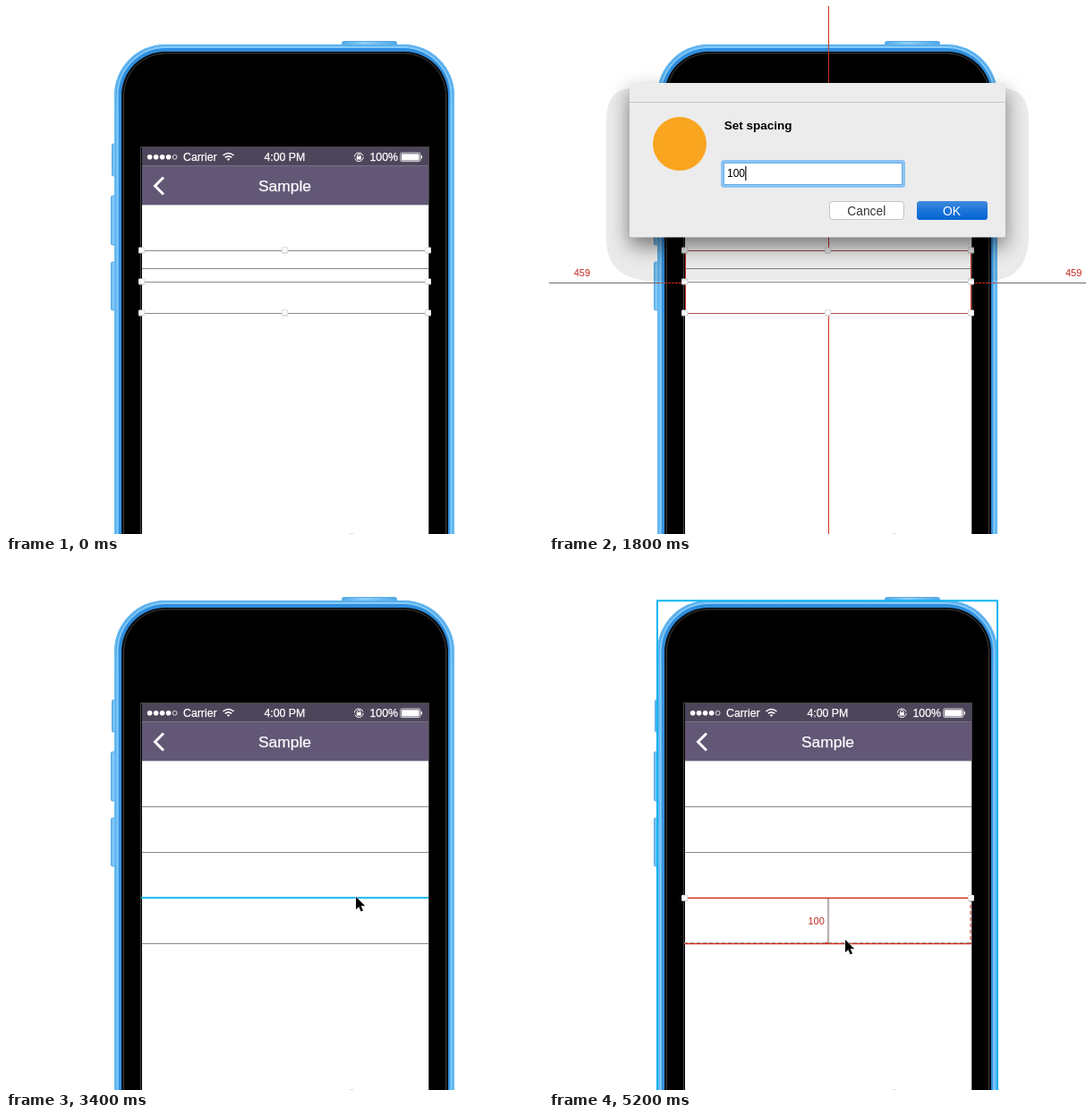
These frames come from a looping animation (600 by 590 pixels, 5700 ms). An HTML page:

```html
<!DOCTYPE html>
<html lang="en">
<head>
<meta charset="utf-8">
<title>Set spacing and measure</title>
<style>
  html, body { margin: 0; width: 100%; height: 100%; overflow: hidden; background: #fff; }
  svg { display: block; width: 600px; height: 590px; }
  text { font-family: "Liberation Sans", Arial, sans-serif; }
  .ui text { fill: #fff; stroke: #fff; stroke-width: .25px; font-size: 12.3px; }
  .ui .title { font-size: 17.4px; }
  .red { fill: none; stroke: #d0301f; }
  .num { fill: #c0261c; font-size: 11px; }
  .mid { text-anchor: middle; }
  .button { fill: url(#edge); stroke: #4a9fe0; stroke-width: .8; }
  #dialog { transform-origin: 300px 172px; }
  #sheet { filter: drop-shadow(0 10px 11px rgba(0, 0, 0, .5)); }
</style>
</head>
<body>
<svg viewBox="0 0 600 590">
  <defs>
    <linearGradient id="edge">
      <stop offset="0" stop-color="#4fa9ea"/>
      <stop offset=".4" stop-color="#8fd0fa"/>
      <stop offset="1" stop-color="#4fa9ea"/>
    </linearGradient>
    <linearGradient id="body" x2="0" y2="1">
      <stop offset="0" stop-color="#2f8fdf"/>
      <stop offset=".12" stop-color="#55aeee"/>
    </linearGradient>
    <linearGradient id="blue" x2="0" y2="1">
      <stop offset="0" stop-color="#62b6fb"/>
      <stop offset=".5" stop-color="#2a93fa"/>
      <stop offset="1" stop-color="#087af2"/>
    </linearGradient>
    <g id="handle">
      <rect x="-3.5" y="-3.5" width="7" height="7" rx="1" fill="#c9c9c9"/>
      <rect x="-3" y="-3" width="6" height="5.5" rx="1" fill="#fafafa"/>
    </g>
  </defs>

  <g id="phone">
    <rect class="button" x="375.5" y="39.5" width="61" height="8" rx="2"/>
    <rect class="button" x="118.5" y="154" width="6" height="36" rx="1.5"/>
    <rect class="button" x="117.5" y="212" width="6" height="55" rx="1.5"/>
    <rect class="button" x="117.5" y="286" width="6" height="54" rx="1.5"/>
    <rect x="121" y="43" width="380" height="700" rx="57" fill="url(#body)"/>
    <rect x="122" y="44" width="378" height="700" rx="56" fill="none" stroke="#68baf2" stroke-width="1.6"/>
    <rect x="124.5" y="46" width="373" height="700" rx="54" fill="none" stroke="#86cbf8" stroke-width="1.8"/>
    <rect x="127.5" y="49" width="367" height="700" rx="51" fill="none" stroke="#2f8ddd" stroke-width="2.4"/>
    <rect x="129" y="51" width="365" height="700" rx="49" fill="#0a0d12"/>
    <rect x="131.5" y="53" width="360" height="700" rx="47" stroke="#3a3a3a"/>
    <rect x="150.5" y="157.5" width="322" height="450" stroke="#444"/>
    <rect x="152" y="222" width="320" height="368" fill="#fff"/>
    <rect x="152" y="158" width="320" height="21" fill="#4d465b"/>
    <rect x="152" y="179" width="320" height="43" fill="#625876"/>
    <path d="M152 178.5H472" stroke="#77717f"/>
    <path d="M152 222.5H472" stroke="#c9c5d0"/>
    <path d="M384 589.5h4" stroke="#ddd"/>
  </g>

  <g class="ui">
    <g id="signal" fill="#fff"></g>
    <text x="198" y="173">Carrier</text>
    <g fill="none" stroke="#fff" stroke-width="1.6">
      <path d="M242.5 167q6-5 12 0M244.8 169.4q3.7-3 7.4 0"/>
      <path d="M248.5 173l-1.8-2q1.8-1.3 3.6 0z" fill="#fff" stroke="none"/>
    </g>
    <text class="mid" x="311.3" y="173">4:00 PM</text>
    <g fill="none" stroke="#fff">
      <circle cx="394.3" cy="168.8" r="4.8" stroke-dasharray="13 2"/>
      <path d="M392.8 168v-1a1.5 1.5 0 0 1 3 0v1"/>
    </g>
    <rect x="391.8" y="168" width="5" height="3.6" fill="#fff"/>
    <text x="406.5" y="173">100%</text>
    <rect x="440.8" y="164" width="22" height="9.6" rx="1.5" fill="none" stroke="#fff" stroke-width=".8"/>
    <rect x="442" y="165.2" width="19.6" height="7.2" rx=".5" fill="#fff"/>
    <path d="M464.3 167v3.6" stroke="#fff" stroke-width="1.4"/>
    <path d="M176 191.5L166.5 201l9.5 9.5" fill="none" stroke="#fff" stroke-width="3"/>
    <text class="title mid" x="311.5" y="207">Sample</text>
  </g>

  <path id="rows" stroke="#8a8a8a"/>
  <path id="hot" d="M151 375H472" stroke="#10b5ee" stroke-width="2"/>
  <path id="frame" d="M121 600V43.2H501V600" fill="none" stroke="#0fb4f0" stroke-width="2"/>

  <g id="guides">
    <path id="level" d="M0 309.5H121M501 309.5H600"/>
    <path class="red" d="M121 309.5H152M472 309.5H501" stroke-dasharray="3 1"/>
    <path class="red" d="M312.5 0V273M312.5 344V590M152.5 273V344M471.5 273V344"/>
    <path d="M152 273.5H472M152 343.5H472" stroke="#a85450"/>
    <text class="num" x="27.7" y="302">459</text>
    <text class="num" x="577" y="302">459</text>
    <text class="num" x="290" y="105" style="fill:#e0281c">686</text>
  </g>

  <g id="measure">
    <path d="M312 1V51" stroke="#bdb4b4" stroke-width="2.4"/>
    <path d="M308 50.5h8" class="red"/>
    <path d="M151 .5H472" class="red" stroke-width="1.4"/>
    <path d="M151 51.5H472" class="red" stroke-width="1.4"/>
    <path d="M471 1V51" class="red" stroke="#d9603a" stroke-dasharray="4 3"/>
    <path id="dash" d="M151 0H472" stroke="#999" stroke-dasharray="4 3"/>
    <text class="num" x="289.5" y="30">100</text>
  </g>
  <g id="handles"></g>

  <g id="dialog">
    <path d="M64 128Q64 94 90 92H510Q536 94 536 128V260Q534 307 490 307H112Q64 304 64 260Z" fill="#000" fill-opacity=".08"/>
    <rect id="sheet" x="90" y="86" width="420" height="172.5" rx="3" fill="#ececec"/>
    <path d="M90 107.5H510" stroke="#c6c6c6"/>
    <circle cx="146" cy="154" r="30" fill="#f9a51f"/>
    <text x="195.7" y="138" font-size="13.5" font-weight="bold">Set spacing</text>
    <rect x="193.5" y="173.5" width="203" height="28" rx="2" fill="#fff" stroke="#8cc4f2" stroke-width="3"/>
    <rect x="195.5" y="175.5" width="199" height="24" fill="none" stroke="#6aaee6"/>
    <text id="value" x="199" y="191" font-size="12"></text>
    <path id="caret" stroke="#111" stroke-width="1.2"/>
    <rect x="313.5" y="218.5" width="83" height="20" rx="3.5" fill="#fff" stroke="#c3c3c3"/>
    <text class="mid" x="354.8" y="233.5" font-size="13.8" fill="#333">Cancel</text>
    <rect x="411" y="218" width="79" height="21" rx="3.5" fill="url(#blue)"/>
    <rect id="press" x="411" y="218" width="79" height="21" rx="3.5" fill="#003a9c" fill-opacity=".35"/>
    <text class="mid" x="450" y="233.5" font-size="13.8" fill="#fff">OK</text>
  </g>

  <path id="cursor" d="M0 0V14.2L3.3 11.2L5.6 16.6L8 15.6L5.7 10.3H10.2Z" stroke="#fff" stroke-width="1.1" paint-order="stroke"/>
</svg>
<script>
  const LOOP = 5700;
  const $ = id => document.getElementById(id);
  const show = (id, on) => { $(id).style.display = on ? '' : 'none'; };

  $('signal').innerHTML = [0, 1, 2, 3, 4].map(i =>
    `<circle cx="${160.6 + 7 * i}" cy="168.8" r="${i < 4 ? 2.8 : 2.4}"` +
    (i < 4 ? '/>' : ' fill="none" stroke="#fff" stroke-width=".8"/>')).join('');

  const tight = [273, 293, 308, 343];
  const spaced = [273, 324, 375, 426];

  const guided = { rows: tight, select: 'group', guides: true };
  const dialog = { ...guided, dialog: 1, value: '', caret: true };
  const typed = { ...dialog, value: '100' };
  const picked = { select: 'row' };

  // [start in ms, what is visible]
  const steps = [
    [0, { rows: tight, select: 'group' }],
    [100, guided],
    [400, { ...dialog, dialog: 1.06 }],
    [600, dialog],
    [1000, { ...dialog, value: '1' }],
    [1200, { ...dialog, value: '10' }],
    [1400, typed],
    [1600, { ...typed, caret: false }],
    [1800, { ...typed, press: true }],
    [2000, guided],
    [2200, { select: 'group' }],
    [2400, {}],
    [2600, { cursor: [440, 478] }],
    [2800, { cursor: [425, 450], frame: true }],
    [3000, { cursor: [412, 424], hot: 426 }],
    [3200, { cursor: [400, 399], frame: true }],
    [3400, { cursor: [391, 374], hot: 375 }],
    [3600, { cursor: [390, 374], hot: 375 }],
    [3800, { ...picked, cursor: [389, 373] }],
    [4000, { ...picked, cursor: [374, 352], frame: true }],
    [4200, { ...picked, cursor: [357, 331], frame: true, measure: 324 }],
    [4400, { ...picked, cursor: [351, 326], frame: true, measure: 324 }],
    [4900, { ...picked, cursor: [343, 392], frame: true, measure: 375 }],
    [5100, { ...picked, cursor: [335, 415], frame: true, measure: 375 }],
    [5200, { ...picked, cursor: [331, 422], frame: true, measure: 375 }]
  ];

  function handlePoints(select, rows) {
    if (select === 'row') return [[151.5, 375.5], [471.5, 375.5]];
    if (select !== 'group') return [];
    const top = rows[0], bottom = rows[3], middle = (top + bottom) / 2;
    return [[151.5, top], [311.5, top], [471.5, top], [151.5, middle], [471.5, middle],
      [151.5, bottom], [311.5, bottom], [471.5, bottom]];
  }

  function draw(s) {
    const rows = s.rows || spaced;
    $('rows').setAttribute('d', rows.map(y => `M152 ${y + .5}H472`).join(''));
    $('handles').innerHTML = handlePoints(s.select, rows)
      .map(([x, y]) => `<use href="#handle" x="${x}" y="${y}"/>`).join('');

    show('guides', s.guides);
    $('level').setAttribute('stroke', s.dialog ? '#6e6a6a' : '#a0443a');

    show('dialog', s.dialog);
    if (s.dialog) {
      $('dialog').style.transform = `scale(${s.dialog})`;
      $('dialog').style.opacity = s.dialog > 1 ? .83 : 1;
      $('value').textContent = s.value;
      $('caret').setAttribute('d', `M${199.8 + 6.67 * s.value.length} 179V195`);
      show('caret', s.caret);
      show('press', s.press);
    }

    show('frame', s.frame);
    show('hot', s.hot);
    if (s.hot) $('hot').setAttribute('d', `M151 ${s.hot + .3}H472`);

    show('measure', s.measure);
    if (s.measure) {
      $('measure').setAttribute('transform', `translate(0 ${s.measure})`);
      $('dash').setAttribute('transform', `translate(0 ${s.measure < 375 ? -.5 : 50.5})`);
    }

    show('cursor', s.cursor);
    if (s.cursor) $('cursor').setAttribute('transform', `translate(${s.cursor})`);
  }

  const start = performance.now();
  let current;
  function tick() {
    const t = (performance.now() - start) % LOOP;
    const step = steps.filter(([from]) => from <= t).pop() || steps[0];
    if (step !== current) draw((current = step)[1]);
    requestAnimationFrame(tick);
  }
  tick();
</script>
</body>
</html>
```
